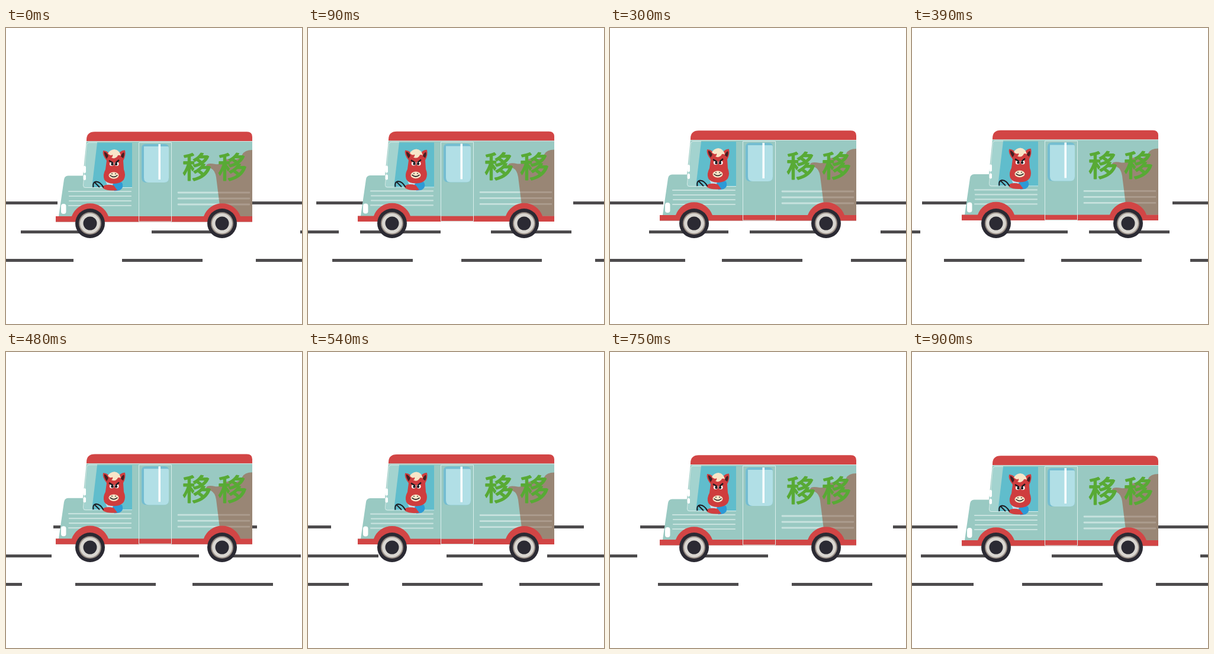
Recreate the animation shown at these times as an HTML page. Size 500 by 500 pixels, loop 0.93 s.

```html
<!DOCTYPE html>
<html lang="zh">
<head>
<meta charset="utf-8">
<title>Van on the road</title>
<style>
  html, body { margin: 0; width: 100%; height: 100%; overflow: hidden; background: #fff; }
  svg { display: block; width: 100vw; height: 100vh; }
  text { font: 300 49px "Noto Sans CJK SC", "Noto Sans CJK", sans-serif; }
</style>
</head>
<body>
<svg viewBox="0 0 500 500">
  <defs>
    <g id="wheel">
      <circle r="25" fill="#2b2a33"/>
      <circle r="19" fill="#9b9088"/>
      <circle r="17" fill="#d9d6d1"/>
      <circle r="11.5" fill="#2b2a33"/>
    </g>
  </defs>

  <g id="road" fill="#4d4b4d"></g>

  <g id="van">
    <path fill="#99c9c2" d="M136 190H416V327.500H84V318H89L98 256Q99 249.500 105 249.500H130Z"/>
    <path fill="#d24545" d="M136 191V189Q136 175.300 150 175.300H407Q416 175.300 416 184V191Z"/>
    <path stroke="#d5eae6" d="M136 191.500H416"/>

    <!-- cab window -->
    <path fill="#a3d3cf" d="M138 194H155L147 270H131Z"/>
    <path fill="#60bdcc" d="M154 194H213V270H145Z"/>
    <path fill="none" stroke="#d9eeeb" d="M154 193.500H140Q137 193.500 136.500 197L130.500 266Q130.500 269.500 134 269.500H213"/>
    <g fill="#fff">
      <rect x="130.500" y="233" width="4.500" height="12" rx="2"/>
      <rect x="130.500" y="248" width="4.500" height="9" rx="2"/>
      <rect x="93" y="297" width="8.500" height="17" rx="4"/>
    </g>

    <!-- driver -->
    <path fill="#bfe3f2" d="M168 258H192L186 268H172Z"/>
    <path fill="#2d9ad6" d="M180 264Q188 258 196 261Q200 270 192 274L183 276Z"/>
    <path fill="#d13f40" d="M164 267Q170 263 182 266L188 274Q172 276 164 271Z"/>
    <path fill="none" stroke="#1d1b20" stroke-width="2" d="M147.500 269Q146 260 152 259.500Q160 260 164.500 269.500M150 261L158 269"/>
    <path fill="#cf3d3e" d="M170 224Q162 214 164 207Q171 207 175 213H190Q194 206 201 206.500Q203 215 198 224L199 239Q203 248 199 256Q194 263 182 263Q170 263 166 256Q163 248 168 239Z"/>
    <path fill="#452024" d="M170 221Q165 213 166 209Q171 211 173 216ZM198 220Q201 213 199 210Q195 212 194 217Z"/>
    <path fill="#f8e5c8" d="M172 212Q175 206 183 205Q192 206 194 216Q189 213 188 217Q184 222 178 219Q181 217 180 214Q177 217 172 212Z"/>
    <g fill="#fff">
      <circle cx="178.500" cy="229.500" r="3.600"/>
      <circle cx="187" cy="229.500" r="3.600"/>
    </g>
    <g fill="#1d1b20">
      <circle cx="179.500" cy="230" r="2.200"/>
      <circle cx="186" cy="230" r="2.200"/>
    </g>
    <path stroke="#1d1b20" stroke-width="2.500" d="M174 224L181 228M191 223L185 228"/>
    <ellipse cx="182" cy="249" rx="8.500" ry="5.800" fill="#f8e5c8"/>
    <path fill="none" stroke="#1d1b20" stroke-width="1.500" stroke-linecap="round" d="M176 249Q182 254 188 249M179 246V246.500M185 246V246.500"/>

    <!-- side decoration -->
    <path fill="#998675" d="M416 206Q403 206 399 214Q396 222 386 222Q374 219 367 225Q362 231 354 230Q340 227 338 232Q340 236 346 237Q353 240 355 252L361 300V318H416Z"/>
    <text x="298 358" y="252.500" fill="#58aa35" stroke="#58aa35" stroke-width="2" stroke-linejoin="round">移移</text>
    <path fill="none" stroke="#fff" stroke-opacity=".45" stroke-width="2.200" stroke-linecap="round"
      d="M106 276H211M107 284H211M107 292H211M106 300H211"/>
    <path fill="none" stroke="#fff" stroke-opacity=".45" stroke-width="2.800" stroke-linecap="round"
      d="M291 278H357M291 288H358M291 298H360"/>
    <path fill="none" stroke="#fff" stroke-opacity=".18" stroke-width="2.800" stroke-linecap="round"
      d="M359 278H411M360 288H411M361 298H411"/>

    <!-- bumper and arches -->
    <path fill="#d24545" d="M84 318H111A33 33 0 0 1 173 318H334A33 33 0 0 1 396 318H416V327.500H84Z"/>

    <!-- door -->
    <path fill="#99c9c2" d="M224 193H279V318H224Z"/>
    <path fill="none" stroke="#d9eeeb" d="M224.500 193.500H279.500V327H224.500Z"/>
    <path fill="#74bdd1" d="M229 203Q229 196 236 196H268Q275 196 275 203V253Q275 261 267 261H237Q229 261 229 253Z"/>
    <path fill="#b1dfe6" d="M233 200H273Q275 200 275 203V253Q275 261 267 261H241Q233 261 233 253Z"/>
    <path fill="#fff" d="M257.500 196H261V256H257.500Z"/>
  </g>

  <use href="#wheel" x="142" y="330"/>
  <use href="#wheel" x="365" y="330"/>
</svg>

<script>
const LOOP = 930, STEP = 30, TURN = 900;
const SPAN = 642;      // distance after which the lane pattern repeats
const BOUNCE = 3;
const lanes = [
  { y: 293, dashes: [[-49, 136], [166, 136], [385, 136]] },
  { y: 342, dashes: [[-145, 134], [25, 136], [246, 136]] },
  { y: 390, dashes: [[-22, 136], [196, 136], [422, 136]] }
];
const road = document.getElementById("road");
const van = document.getElementById("van");

const marks = lanes.flatMap(({ y, dashes }) => dashes.map(([start, width]) => {
  const rect = document.createElementNS("http://www.w3.org/2000/svg", "rect");
  const box = { y, width, height: 5 };
  for (const key in box) rect.setAttribute(key, box[key]);
  road.append(rect);
  return { rect, start };
}));

function draw(now) {
  const t = Math.floor(now % LOOP / STEP) * STEP;
  const shift = Math.round(t * 632 / TURN);
  for (const { rect, start } of marks)
    rect.setAttribute("x", (start + shift + 136 + SPAN) % SPAN - 136);
  const lift = BOUNCE * (1 - Math.abs(2 * t / TURN - 1));
  van.setAttribute("transform", `translate(0 ${-lift})`);
}

const begin = performance.now();
function tick() {
  draw(performance.now() - begin);
  requestAnimationFrame(tick);
}
tick();
</script>
</body>
</html>
```
